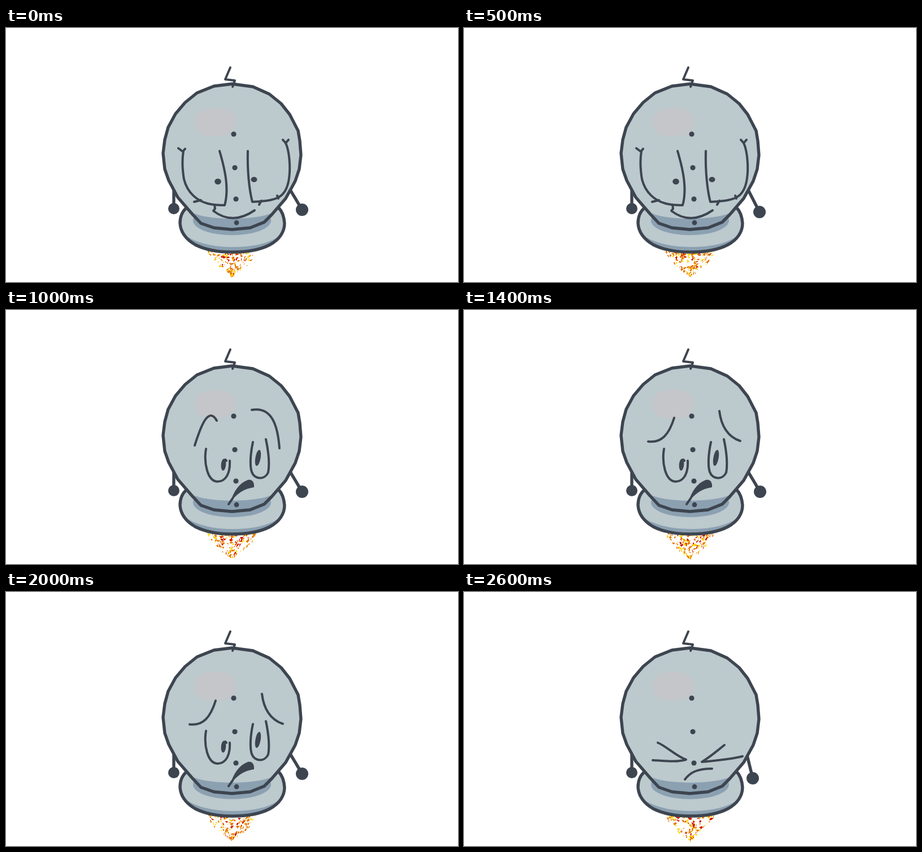
An HTML page that plays this animation: 800x450 px, repeating every 2700 ms.

```html
<!DOCTYPE html>
<html lang="en">
<head>
<meta charset="utf-8">
<title>Bulb robot</title>
<style>
  html, body { margin: 0; width: 100%; height: 100%; overflow: hidden; background: #fff; }
  svg { display: block; width: 100vw; height: 100vh; }
  .line { fill: none; stroke: #3d4550; stroke-width: 4; stroke-linecap: round; stroke-linejoin: round; }
  .thick { stroke-width: 5.4; }
  .ink { fill: #3d4550; }
  .metal { fill: #bcc9cd; }
  .shade { fill: #8ba0b1; }
</style>
</head>
<body>
<svg viewBox="0 0 800 450">
  <defs>
    <path id="head" d="M400 99L437 104 466 117 487 134 502 153 517 182 520 200 522 225 519 250 512 271 495 302 470 331 457 344 432 354 400 357 368 354 345 346 330 330 304 300 288 270 281 250 278 222 281 198 287 176 300 152 317 132 338 115 368 103Z"/>
    <path id="base" d="M319 319C311 326 308 336 308 346C309 362 318 374 335 384C353 393 376 397 400 397C426 397 450 393 467 384C484 375 493 361 493 346C492 334 489 325 483 319Z"/>
    <clipPath id="inHead"><use href="#head"/></clipPath>
    <clipPath id="inBase"><use href="#base"/></clipPath>
  </defs>

  <g id="flame" shape-rendering="crispEdges">
    <path fill="#e67a00"/><path fill="#ffd800"/><path fill="#d21a08"/>
  </g>

  <path class="line thick" d="M297 284V320"/>
  <circle class="ink" cx="297" cy="320" r="10"/>
  <path id="arm" class="line thick"/>
  <circle id="hand" class="ink" r="11"/>

  <use href="#base" class="shade"/>
  <g clip-path="url(#inBase)">
    <path class="metal" d="M300 310V352C318 375 355 388 400 388S482 379 500 352V310Z"/>
    <ellipse class="shade" cx="400" cy="341" rx="69" ry="26"/>
  </g>
  <use href="#base" class="line thick"/>

  <use href="#head" class="metal"/>
  <path class="shade" clip-path="url(#inHead)" d="M326 325C350 342 450 342 476 325V362H326Z"/>
  <rect x="334" y="142" width="72" height="50" rx="27" ry="23" fill="#c4c6c9"/>
  <use href="#head" class="line thick"/>
  <path class="line" d="M397 70L388 91 405 93 401 104"/>

  <g id="happy" class="line">
    <path d="M305 213L313 219 317 214M314 218C311 236 312 250 315 268C321 292 338 306 357 311C368 314 378 314 387 314C395 285 388 252 378 218M333 308L345 305"/>
    <path d="M428 218C427 250 430 285 436 308C460 307 478 305 488 296C500 285 503 265 502 240C501 222 499 211 494 202M490 198L495 204 500 198M452 306L448 313M480 297L482 302"/>
    <path d="M369 313L370 320 367 324Q401 350 440 323"/>
    <g class="ink" stroke="none">
      <ellipse cx="375" cy="272" rx="5.8" ry="5.2"/><ellipse cx="439" cy="268.500" rx="5.500" ry="4.700"/>
    </g>
  </g>

  <g id="sad" class="line">
    <path id="brows"/>
    <path d="M354 246C350 270 356 303 374 304C390 304 397 288 396 267M437 234C433 252 431 275 435 287C440 301 458 301 464 288C467 272 464 248 460 229"/>
    <g class="ink" stroke="none">
      <ellipse cx="385" cy="274" rx="4.300" ry="10.500" transform="rotate(5 385 274)"/>
      <ellipse cx="446" cy="262" rx="4.600" ry="14.500" transform="rotate(10 446 262)"/>
      <path d="M397 340C403 322 412 307 428 301C436 299 440 306 439 314C420 317 408 326 399 339Z"/>
    </g>
    <path d="M388 265L390 267M394 344L401 334"/>
  </g>

  <g id="squint" class="line">
    <path d="M343 267C358 273 374 290 393 297C375 302 355 299 334 298M461 271C446 283 436 292 421 301C450 298 470 297 493 291M391 332C400 320 412 313 439 313"/>
  </g>

  <g class="ink">
    <circle cx="403" cy="188" r="4.600"/><circle cx="405" cy="247.500" r="4.600"/>
    <circle cx="407" cy="303" r="4.600"/><circle cx="408" cy="345" r="4.400"/>
  </g>
</svg>
<script>
const LOOP = 2700, STEP = 100;
const el = id => document.getElementById(id);
const clamp = v => Math.max(0, Math.min(1, v));
const mix = (a, b, k) => a.map((v, i) => v + (b[i] - v) * k);

const RAISED = [334, 240, 342, 215, 357, 167, 373, 196, 435, 177, 471, 171, 481, 205, 484, 245];
const DROOPY = [326, 233, 350, 236, 363, 220, 372, 191, 452, 179, 455, 205, 467, 225, 489, 232];
const RESTING = DROOPY.map((v, i) => v + (i % 2 ? 1.5 : i < 8 ? -1 : 1));
const curve = p => `M${p.slice(0, 2)}C${p.slice(2, 8)}`;

function random(seed) {
  return () => {
    seed = seed + 0x6D2B79F5 | 0;
    let n = Math.imul(seed ^ seed >>> 15, 1 | seed);
    n = n + Math.imul(n ^ n >>> 7, 61 | n) ^ n;
    return ((n ^ n >>> 14) >>> 0) / 4294967296;
  };
}

// Torn slivers: dense under the base, thinning out to a point
function drawFlame(step) {
  const rnd = random(step * 977 + 41), layers = ['', '', ''];
  for (let i = 0; i < 165; i++) {
    const depth = rnd() ** 1.6, side = rnd() * 2 - 1;
    const x = 400 + side * 42 * (1 - depth ** 1.7), y = 395 + depth * 45;
    const angle = -side * 1.1 + (rnd() - .5) * 1.8;
    const length = (2.5 + rnd() * 6) * (1 - depth * .4), width = 1.5 + rnd() * 2.5;
    const dx = Math.cos(angle) * length, dy = Math.sin(angle) * length;
    const pick = rnd(), core = Math.abs(side) < .55 && depth < .5;
    const color = pick < .26 ? 1 : pick > (core ? .7 : .93) ? 2 : 0;
    const points = [dx * .5, dy * .5 - width * .6, dx * .5, dy * .5 + width * .4, -dx * .6, -dy * .6 + width];
    layers[color] += `M${x - dx / 2} ${y - dy / 2}l${points.map(v => v.toFixed(1))}z`;
  }
  [...el('flame').children].forEach((path, i) => path.setAttribute('d', layers[i]));
}

function draw(now) {
  const step = Math.floor(now % LOOP / STEP), t = step * STEP;
  const face = t < 800 ? 'happy' : t < 2500 ? 'sad' : 'squint';
  for (const id of ['happy', 'sad', 'squint']) el(id).style.display = id === face ? '' : 'none';

  const brows = mix(mix(RAISED, DROOPY, clamp((t - 1200) / 200)), RESTING, clamp((t - 1400) / 400));
  el('brows').setAttribute('d', curve(brows.slice(0, 8)) + curve(brows.slice(8)));

  const dip = t < 1000 ? Math.sin(Math.PI * t / 1000) : 0;
  const [x, y] = face === 'squint' ? [511, 330] : [524 - dip, 322 + 4 * dip];
  el('arm').setAttribute('d', `M${face === 'squint' ? 500 : 502} 285L${x} ${y}`);
  el('hand').setAttribute('cx', x);
  el('hand').setAttribute('cy', y);

  drawFlame(step);
}

function tick() {
  draw(performance.now());
  requestAnimationFrame(tick);
}
tick();
</script>
</body>
</html>
```
